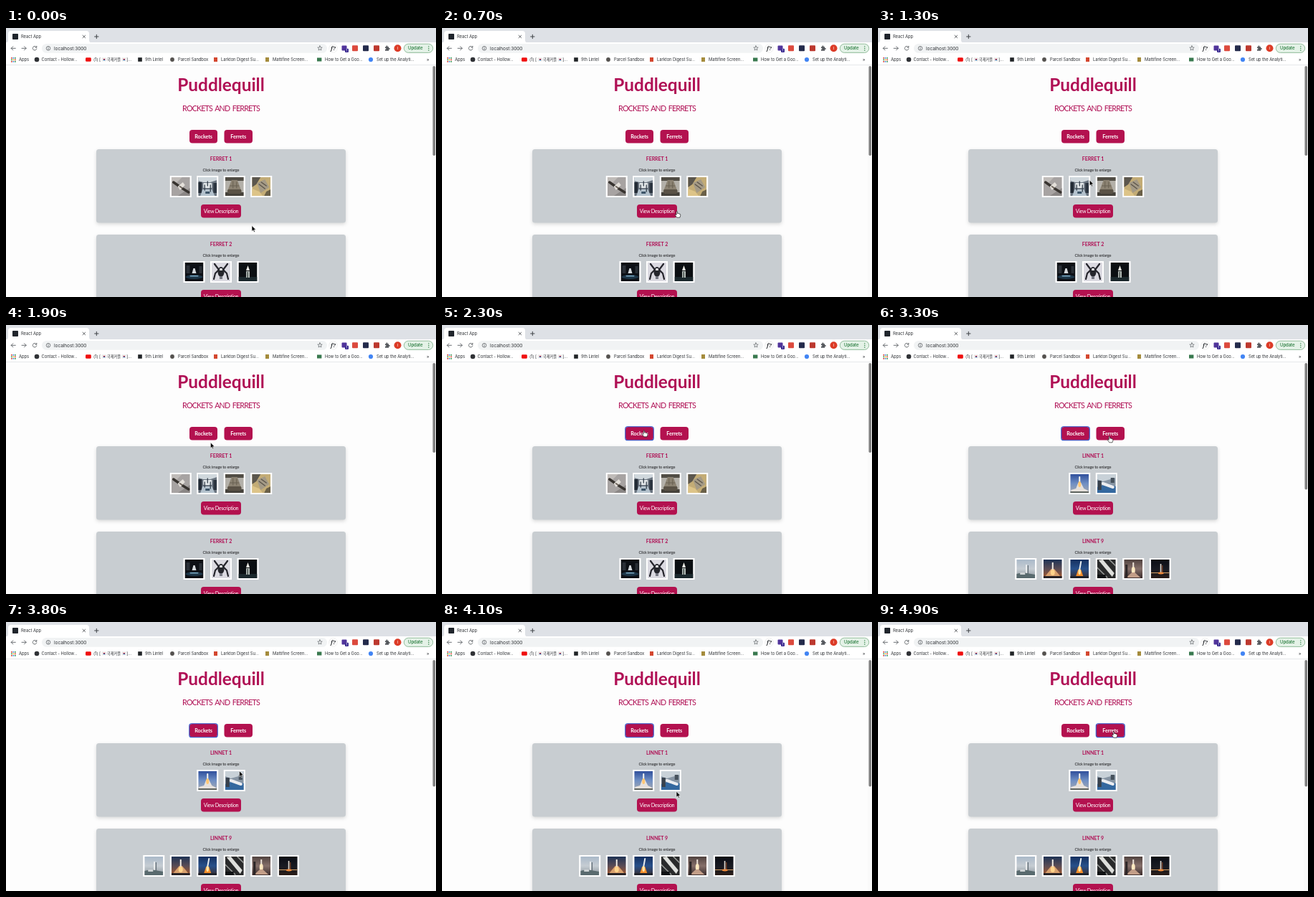
Recreate the animation shown at these times as an HTML page. Size 600 by 375 pixels, loop 5000 ms.

```html
<!DOCTYPE html>
<html lang="en">
<head>
<meta charset="utf-8">
<title>React App</title>
<style>
  html, body { margin: 0; width: 100%; height: 100%; overflow: hidden; background: #fdfdfd; }
  svg { display: block; }
  #stage { width: 100vw; height: 100vh; }
  text { font-family: Inter, "Noto Sans CJK KR", "Noto Sans CJK", sans-serif; font-size: 5.8px; letter-spacing: -.04px; fill: #2f3236; white-space: pre; }
  .page text { font-family: Lato, sans-serif; text-anchor: middle; fill: #b01055; }
  .page .head { font-size: 24.4px; font-weight: 700; letter-spacing: 0; }
  .page .sub { font-size: 10.7px; letter-spacing: -.82px; word-spacing: 1.6px; }
  .page .name { font-size: 7px; font-weight: 700; letter-spacing: -.02px; }
  .page .hint { font-size: 5.7px; letter-spacing: -.18px; fill: #1c1c1e; }
  .page .btn { font-size: 7.2px; font-weight: 700; letter-spacing: -.1px; fill: #fff; }
  .page .more { font-size: 7.2px; letter-spacing: -.35px; fill: #fff; }
  .card { filter: drop-shadow(0 2px 2.5px rgba(0, 0, 0, .15)); }
</style>
</head>
<body>
<svg id="stage" viewBox="0 0 600 375" preserveAspectRatio="none"></svg>
<script>
const LOOP = 5000, STEP = 100, PINK = '#b3114f';

const rect = (fill, x, y, w, h, rx = 0, extra = '') =>
  `<rect x="${x}" y="${y}" width="${w}" height="${h}" rx="${rx}" fill="${fill}" ${extra}/>`;
const oval = (fill, x, y, rx, ry = rx, extra = '') =>
  `<ellipse cx="${x}" cy="${y}" rx="${rx}" ry="${ry}" fill="${fill}" ${extra}/>`;
const shape = (fill, d) => `<path d="${d}" fill="${fill}"/>`;
const line = (color, d, w = 1) =>
  `<path d="${d}" fill="none" stroke="${color}" stroke-width="${w}" stroke-linecap="round" stroke-linejoin="round"/>`;
const text = (x, y, s, attrs = '') => `<text x="${x}" y="${y}" ${attrs}>${s}</text>`;
const fade = (id, ...colors) =>
  `<linearGradient id="${id}" x2="0" y2="1">${colors.map((c, i) =>
    `<stop offset="${i / (colors.length - 1)}" stop-color="${c}"/>`).join('')}</linearGradient>`;
const full = fill => rect(fill, 0, 0, 26, 26);

const defs = `<defs>
  ${fade('day', '#2f4f9c', '#6f8fc4', '#a5a9b0')}
  ${fade('haze', '#aab9c9', '#c6cdd3', '#8b959c')}
  ${fade('dusk', '#1f3355', '#5a4c55', '#a8572a')}
  ${fade('deep', '#15305f', '#28508a', '#3a3034')}
  ${fade('smoke', '#50423f', '#86706a', '#3a2b2b')}
  ${fade('night', '#0b0d14', '#181a22', '#2a1d18')}
</defs>`;

// Photos on a 26 by 26 field
const capsules = [
  full('#a7a3a2') + shape('#c0bcb9', 'M0 0H15L6 9 0 7Z') + shape('#8b8786', 'M26 15V26H9Z') +
    line('#37332f', 'M3 7L10 12M16 16L24 21', 3.4) + shape('#e4e0da', 'M9 13L16 7 19 11 12 18Z') +
    line('#6b625a', 'M12 13L15 15', 2),
  full('#6b7580') + shape('#d0d8dd', 'M0 0H26V4L17 7H7L0 5Z') + rect('#e3e8ea', 7, 8, 12, 7, 1) +
    rect('#232b35', 0, 7, 5, 15) + rect('#2c3540', 21, 8, 5, 14) + shape('#b4c2cd', 'M6 17H19L23 26H3Z') +
    line('#343f4b', 'M9 11V18M13 6V12M17 11V20', 1.3) + rect('#3d5468', 10, 20, 6, 3),
  full('#b3b0a9') + rect('#514d45', 0, 0, 26, 5) + rect('#46423b', 0, 21, 26, 5) +
    shape('#8b8272', 'M9 4H17L23 20 20 23H6L3 20Z') + shape('#5a5246', 'M4 17H22L23 20 20 23H6L3 20Z') +
    line('#696052', 'M7 12H19M11 6V15M16 7V15', 1),
  full('#c3ac76') + shape('#5b564d', 'M0 0H12L6 10 0 14Z') + shape('#a49a86', 'M7 8L18 3 24 14 12 22Z') +
    shape('#ddc488', 'M0 16L10 20 15 26H0Z') + line('#5c554b', 'M10 10L18 16M13 7L20 12', 1.4) +
    shape('#6a6048', 'M20 20L26 17V26H17Z')
];
const crewed = [
  full('#0d1015') + oval('#1d3648', 13, 20, 12, 3) + shape('#d5d9dc', 'M10 15L12 8H14L16 15Z') +
    rect('#79a5be', 7, 18, 12, 1.6, .8) + rect('#2b3037', 2, 4, 5, 11) + rect('#292e35', 20, 5, 4, 10),
  full('#dbdae1') + line('#25252c', 'M4 2L10 10 5 15 3 23M22 2L16 10 21 15 23 23', 2.2) + oval('#25262c', 13, 13, 4.5, 7) +
    shape('#f4f4f5', 'M11.5 8H14.5L15 11H11Z') + rect('#777984', 11, 19, 4, 4),
  full('#0b0f12') + rect('#1b282c', 0, 20, 26, 6) + shape('#efeee6', 'M10.5 11L13 4 15.5 11Z') +
    rect('#b3bab6', 10.5, 12, 5, 9) + rect('#48534f', 12, 13, 1.5, 8)
];
const small = [
  full('url(#day)') + shape('#e6e1dc', 'M11 12H15L19 20 25 23V26H1V22L8 20Z') +
    rect('#f6f6f2', 12, 3, 2, 9, 1) + oval('#ffc773', 13, 14, 2, 4) + rect('#5d625d', 0, 24, 26, 2),
  full('#8795a4') + shape('#c8d1d8', 'M0 0H26V5L8 10 0 7Z') + shape('#34689f', 'M0 18L14 13 26 17V26H0Z') +
    line('#ecedf0', 'M8 13L22 18', 4) + rect('#38414c', 1, 9, 5, 13) + rect('#46515c', 19, 5, 5, 7)
];
const heavy = [
  full('url(#haze)') + rect('#f3f4f4', 13, 7, 1.6, 14) + rect('#626d75', 15.5, 8, 1.3, 13) +
    shape('#596a6e', 'M0 20L9 18 26 21V26H0Z') + rect('#cdd2d4', 5, 18, 7, 3),
  full('url(#dusk)') + shape('#d9a16e', 'M11 13H15L21 20 24 24H2L6 19Z') + rect('#f1ece4', 12, 4, 2, 11) +
    oval('#ffd38b', 13, 18, 3, 4) + rect('#282326', 0, 23, 26, 3),
  full('url(#deep)') + line('#e7ecf0', 'M15 3L13 14', 2) + shape('#f58f2c', 'M11 14H15L18 23H8Z') +
    oval('#ffe4a4', 13, 17, 1.8, 4) + rect('#20232c', 0, 23, 26, 3),
  full('#292a2b') + shape('#dedfdc', 'M2 1L8 0 24 19 21 24Z') + line('#989a98', 'M0 11L14 25M17 0L26 9', 1.6) +
    rect('#101214', 0, 21, 12, 5),
  full('url(#smoke)') + rect('#ebe1d7', 12, 4, 2, 9) + oval('#ffe9c0', 13, 15, 2.5, 5) +
    shape('#c39e88', 'M11 18H15L23 25H3Z') + rect('#2b2526', 2, 7, 3, 18),
  full('url(#night)') + rect('#d1a067', 0, 18, 26, 1) + rect('#e1dbd1', 13, 6, 1.6, 13) +
    rect('#974f2d', 15.5, 8, 1, 11) + oval('#ef8a3c', 14, 19, 4, 1.4)
];

function photos(list, top) {
  return list.map((art, i) => {
    const x = 300 + (i - (list.length - 1) / 2) * 37.5 - 15;
    return rect('#fff', x, top, 30, 30) +
      `<svg x="${x + 2}" y="${top + 2}" width="26" height="26" viewBox="0 0 26 26">${art}</svg>`;
  }).join('');
}

function card(top, name, list) {
  return rect('#c8cdd1', 126, top, 348, 102.5, 3.5, 'class="card"') +
    text(300, top + 15.7, name, 'class="name"') +
    text(300, top + 30.5, 'Click image to enlarge', 'class="hint"') +
    photos(list, top + 37) +
    rect(PINK, 272, top + 77, 56, 18.5, 4) +
    text(300, top + 88.8, 'View Description', 'class="more"');
}

const view = (id, thumb, ...cards) =>
  `<g id="${id}">${cards.join('')}${rect('#7f7f7f', 595.5, 53, 3.6, thumb, 1.8)}</g>`;
const button = (x, w, label) => rect(PINK, x, 142, w, 18.5, 4) + text(x + w / 2, 154.2, label, 'class="btn"');
const focus = (id, x, w) =>
  rect('none', x - .2, 141.8, w + .4, 18.9, 3, `id="${id}" stroke="#2a4cc6" stroke-width="1.1"`);

const page = `<g class="page">
  ${text(300, 87.5, 'Puddlequill', 'class="head"')}
  ${text(300, 116.3, 'ROCKETS AND FERRETS', 'class="sub"')}
  ${button(256, 39, 'Rockets')}${button(304.5, 39.5, 'Ferrets')}
  ${focus('focusA', 256, 39)}${focus('focusB', 304.5, 39.5)}
  ${rect('#fafafa', 594, 52, 6, 323)}
  ${view('viewA', 125, card(169, 'FERRET 1', capsules), card(288, 'FERRET 2', crewed))}
  ${view('viewB', 176.5, card(169, 'LINNET 1', small), card(288, 'LINNET 9', heavy))}
</g>`;

const flag = x => rect('#f1f1f1', x, 41.8, 5.6, 4.2, .4, 'stroke="#bbb" stroke-width=".3"') +
  shape('#cd2e3a', `M${x + 1.5} 44a1.3 1.3 0 0 1 2.6 0Z`) + shape('#0f4a9c', `M${x + 1.5} 44a1.3 1.3 0 0 0 2.6 0Z`);

function bookmarks() {
  const hues = ['#e0443a', '#efb51e', '#3e9c57', '#4285e6'];
  let grid = '';
  for (let i = 0; i < 9; i++) {
    const row = Math.floor(i / 3);
    grid += rect(hues[(i * 3 + row) % 4], 7 + i % 3 * 2.5, 41 + row * 2.5, 1.7, 1.7);
  }
  const links = [
    [194, '9th Lintel'], [240, 'Parcel Sandbox'], [300, 'Larkton Digest Su...'],
    [372, 'Mattifine Screen...'], [445, 'How to Get a Goo...'], [517, 'Set up the Analyti...']
  ];
  return grid + text(18, 46.2, 'Apps') + oval('#303236', 43, 44, 3.3) + text(49.5, 46.2, 'Contact - Hollow...') +
    rect('#f00f0f', 111, 41.2, 7.8, 5.6, 1.4) + text(122, 46.2, '(1) [') + flag(134.2) +
    text(140.8, 46.2, '국제커플', 'style="font-size:5.3px"') + flag(162) + text(168.2, 46.2, ']...') +
    rect('#202326', 184.2, 41.2, 5.6, 5.6) + oval('#55524f', 232, 44, 2.9) +
    rect('#d4472f', 290, 41, 5, 6) + rect('#a58c3d', 362, 41, 5, 6) +
    rect('#39794f', 434, 41.5, 6.4, 5) + oval('#4285f4', 509, 44, 3.1) +
    links.map(([x, s]) => text(x, 46.2, s)).join('') + text(587, 46.2, '»');
}

const puzzle = 'M529 26.2H530.5C529.9 24 533 24 532.4 26.2H534.2V28C536.4 27.4 536.4 30.3 534.2 29.8V31.8H529V29.7C531 30 531 27.7 529 28Z';
const star = 'M438 24.8L438.9 27 441.2 27.2 439.4 28.7 440 31 438 29.8 436 31 436.6 28.7 434.8 27.2 437.1 27Z';

const chrome = rect('#dee1e6', 0, 0, 600, 21) + rect('#fff', 0, 20, 600, 32) +
  shape('#fff', 'M0 20.5Q3 20 3 17V8Q3 4 7 4H112Q116 4 116 8V17Q116 20 119 20.5Z') +
  rect('#20252c', 9, 8, 8, 8, .8) + text(21, 13.9, 'React App') +
  line('#53565a', 'M107 10.2L110.6 13.8M110.6 10.2L107 13.8', .9) +
  line('#3f4246', 'M123.6 12H129M126.3 9.3V14.7', 1) +
  line('#5b5f64', 'M13.3 28.3H7.2M9.8 25.7L7.2 28.3 9.8 30.9', .9) +
  line('#5b5f64', 'M22 28.3H28.1M25.5 25.7L28.1 28.3 25.5 30.9', .9) +
  line('#5b5f64', 'M42.4 26.6A2.8 2.8 0 1 0 42.8 29M42.8 25.3V27.2H40.8', .9) +
  rect('#f1f3f4', 50, 22, 398, 12.8, 6.4) + oval('none', 59, 28.3, 2.8, 2.8, 'stroke="#5f6368" stroke-width=".8"') +
  line('#5f6368', 'M59 28V29.9M59 26.7V26.8', .8) +
  text(67, 30.6, 'localhost:3000', 'style="font-size:6.5px"') + line('#5f6368', star, .7) +
  oval('#fff', 456.5, 28.3, 5.8, 5.8, 'stroke="#ddd" stroke-width=".5"') +
  text(453, 31, 'f?', 'style="font:italic 700 7.5px &quot;Noto Serif&quot;,serif"') +
  rect('#51349b', 468.5, 24.5, 7, 7, 1) + rect('#3b2b91', 473, 28.8, 5, 5.2, 1) +
  text(474.3, 33, '1', 'style="font-size:4.6px;fill:#fff"') +
  rect('#dc4a3e', 483, 24.3, 8, 8, 1) + rect('#242b4c', 498, 24.3, 8, 8, 1) + rect('#bd392f', 513, 24.3, 8, 8, 1) +
  shape('#55585d', puzzle) + oval('#dc3b27', 546.5, 28.3, 5) +
  text(545.7, 30.2, 'I', 'style="font-size:5.4px;fill:#fff"') +
  rect('#e4f2e7', 555.3, 22.2, 40.4, 12.2, 6.1, 'stroke="#7cae87" stroke-width=".8"') +
  text(561, 30.4, 'Update', 'style="font-size:6px;font-weight:500;fill:#23783a"') +
  [25.6, 28.3, 31].map(y => oval('#23783a', 589.8, y, .7)).join('') +
  bookmarks() + rect('#dcdee1', 0, 51.2, 600, .7);

const pointer = `<g id="pointer" stroke-width=".6" stroke-linejoin="round">
  <path id="arrow" fill="#000" stroke="#fff" d="M0 0V8L1.9 6.3 3.1 9 4.4 8.4 3.2 5.8H5.7Z"/>
  <path id="hand" fill="#fff" stroke="#000" d="M-.9 .8C-.9-.3 .6-.3 .6 .8V3.2C1.2 2.6 2 2.8 2.1 3.5 2.7 3 3.5 3.3 3.5 4 4.1 3.6 4.8 4 4.8 4.7V6.4L4 8.8H-.2L-2.6 5.6C-3 4.7-2 4.2-1.4 4.8L-.9 5.4Z"/>
</g>`;

document.getElementById('stage').innerHTML = defs + rect('#fdfdfd', 0, 0, 600, 375) + page + chrome + pointer;

// time, x, y of the pointer tip
const path = [
  [0, 343, 275.5], [400, 343, 275.5], [1200, 295.2, 212], [1500, 295.2, 212],
  [2100, 282, 147], [2900, 282, 147], [3300, 323, 155], [3500, 323, 155],
  [4000, 327, 236.3], [4200, 327, 236.3], [4700, 329, 152.5], [5000, 329, 152.5]
];
const targets = [[256, 142, 39, 18], [304, 142, 40, 18], [272, 246, 56, 18]];

function tip(t) {
  const i = path.findIndex(p => p[0] > t);
  const [t0, x0, y0] = path[i - 1], [t1, x1, y1] = path[i];
  const u = (t - t0) / (t1 - t0), k = u * u * (3 - 2 * u);
  return [x0 + (x1 - x0) * k, y0 + (y1 - y0) * k];
}

const el = id => document.getElementById(id);
const show = (id, on) => { el(id).style.display = on ? '' : 'none'; };

function draw(now) {
  const t = Math.floor(now % LOOP / STEP) * STEP;
  const [x, y] = tip(t);
  const over = targets.some(([a, b, w, h]) => x >= a && x <= a + w && y >= b && y <= b + h);
  el('pointer').setAttribute('transform', `translate(${x.toFixed(2)} ${y.toFixed(2)})`);
  show('arrow', !over);
  show('hand', over);
  show('viewA', t < 2500);
  show('viewB', t >= 2500);
  show('focusA', t >= 2200 && t < 4800);
  show('focusB', t >= 4800);
}

const start = performance.now();
function tick() {
  draw(performance.now() - start);
  requestAnimationFrame(tick);
}
tick();
</script>
</body>
</html>
```
